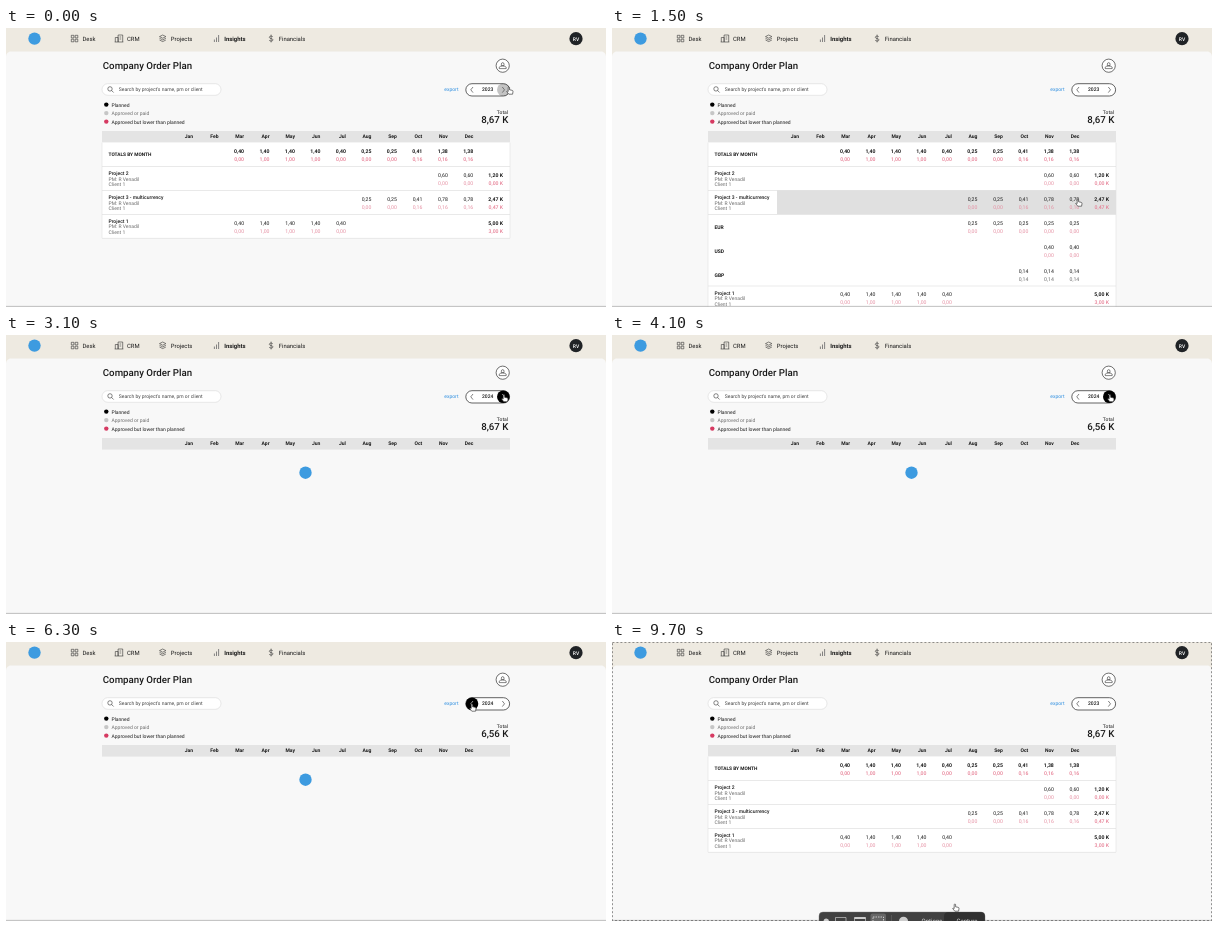
Recreate the animation shown at these times as an HTML page. Size 600x279 px, loop 10 s.

```html
<!DOCTYPE html>
<html lang="en">
<head>
<meta charset="utf-8">
<title>Company Order Plan</title>
<style>
html, body { margin: 0; width: 100%; height: 100%; overflow: hidden; background: #f8f8f8; }
svg { display: block; width: 100%; height: 100%; }
text { font-family: Roboto, Inter, sans-serif; font-size: 5px; fill: #1a1a1a; text-rendering: geometricPrecision; white-space: pre; }
.num { font-size: 5.15px; }
.m { font-weight: 500; }
.b { font-weight: 700; }
.e { text-anchor: end; }
.c { text-anchor: middle; }
.dim { fill: #6c6c6c; }
.pink { fill: #e58fa2; }
.red { fill: #e67f95; font-weight: 500; }
.nav { font-size: 5.9px; }
.big { font-size: 9.7px; font-weight: 500; }
.bar { font-size: 6px; fill: #ddd; }
.line { fill: none; stroke: #333; stroke-width: .6; }
</style>
</head>
<body>
<svg viewBox="0 0 600 279" preserveAspectRatio="none">
  <g id="base"></g>
  <g id="live"></g>
</svg>
<script>
const LOOP = 10000, STEP = 100;
const ROW = 23.9, TOP = 138.5, LEFT = 96, RIGHT = 504, WIDTH = RIGHT - LEFT;
const MONTHS = 'Jan Feb Mar Apr May Jun Jul Aug Sep Oct Nov Dec'.split(' ');
const PM = 'R Venadil', INITIALS = 'RV', BRAND = '#3d9be0';

// A span adds the same amount to every month from first to last.
const span = (first, last, amount) => ({ first, last, amount });
const series = spans => MONTHS.map((_, i) =>
  spans.reduce((sum, s) => sum + (i >= s.first && i <= s.last ? s.amount : 0), 0));
const entry = (name, plan, low = []) => ({ name, plan: series(plan), low: series(low) });

const MULTI = 'Project 3 - multicurrency';
const rest = span(9, 11, .157);
const YEARS = {
  2023: [
    entry('Project 2', [span(10, 11, .6)]),
    entry(MULTI, [span(7, 11, .25), rest, span(10, 11, .373)], [rest]),
    entry('Project 1', [span(2, 6, .4), span(3, 5, 1)], [span(3, 5, 1)])
  ],
  2024: [
    entry('Project 2', [span(0, 4, .6)]),
    entry(MULTI, [span(0, 6, .4), span(0, 1, .38)])
  ],
  2025: [entry(MULTI, [span(0, 2, .157)])]
};
const pounds = [span(9, 11, .14)];
const CURRENCIES = [entry('EUR', [span(7, 11, .25)]), entry('USD', [span(10, 11, .4)]), entry('GBP', pounds, pounds)];

// Click time, loading time, year
const LOADS = [[0, 0, 2023], [3000, 200, 2024], [4100, 200, 2025], [5300, 200, 2024], [6300, 300, 2023]];
// Pointer stops: time, x, y
const PATH = [
  [0, 503, 59], [200, 504.5, 58.5], [300, 504.5, 58.5], [1000, 466, 171], [1900, 466, 171], [2200, 494.5, 102.5],
  [2900, 498, 59.5], [4300, 498, 59.5], [4900, 466, 62], [7100, 466, 62], [7400, 343, 262], [LOOP, 343, 262]
];

const clamp = v => Math.max(0, Math.min(1, v));
const sum = list => list.reduce((a, b) => a + b, 0);
const money = v => v.toFixed(2).replace('.', ',');
const monthX = i => 187.1 + 25.47 * i;

const text = (x, y, s, cls = '', extra = '') => `<text x="${x}" y="${y}" class="${cls}" ${extra}>${s}</text>`;
const rect = (x, y, w, h, fill, extra = '') => `<rect x="${x}" y="${y}" width="${w}" height="${h}" fill="${fill}" ${extra}/>`;
const dot = (x, y, r, fill, extra = '') => `<circle cx="${x}" cy="${y}" r="${r}" fill="${fill}" ${extra}/>`;
const line = (d, extra = '') => `<path class="line" d="${d}" ${extra}/>`;
const rule = y => rect(LEFT, y - .3, WIDTH, .6, '#dcdcdc');

function pointerAt(t) {
  const i = PATH.findIndex(p => p[0] > t);
  const [t0, x0, y0] = PATH[i - 1], [t1, x1, y1] = PATH[i];
  const k = (t - t0) / (t1 - t0);
  return { x: x0 + (x1 - x0) * k, y: y0 + (y1 - y0) * k };
}

function icons() {
  const squares = [0, 1, 2, 3].map(i => `M${65.3 + 3.9 * (i % 2)} ${7.3 + 3.9 * (i >> 1)}h2.6v2.6h-2.6z`).join('');
  return line(squares) +
    line('M109.3 14V9.5h2.8V14M112.1 14V7h4.6v7M108.7 14h8.6M113.6 9h1.6M113.6 11h1.6') +
    line('M156.7 7l3.2 1.6-3.2 1.6-3.2-1.6zM153.5 10.3l3.2 1.6 3.2-1.6M153.5 12l3.2 1.6 3.2-1.6') +
    line('M208.4 14v-2.5M210.5 14V9.5M212.6 14V7', 'style="stroke:#777;stroke-width:.9"') +
    line('M266.8 8.8c-.5-1-3.5-1.1-3.5.5 0 1.7 3.7.8 3.7 2.6 0 1.6-3.4 1.5-3.9.2M265.1 6.6v7.8');
}

function drawBase() {
  const nav = [[76.5, 'Desk'], [121, 'CRM'], [164.8, 'Projects'], [218.2, 'Insights'], [272.7, 'Financials']];
  const legend = [['#000', 'Planned', ''], ['#c6c6c6', 'Approved or paid', 'dim'], ['#d63a62', 'Approved but lower than planned', '']];
  return rect(0, 0, 600, 40, '#eeeae1') +
    '<path d="M0 279V28.5a5 5 0 0 1 5-5H595a5 5 0 0 1 5 5V279z" fill="#f8f8f8"/>' +
    dot(28.5, 10.6, 6.2, BRAND) + icons() +
    nav.map(([x, s]) => text(x, 12.7, s, s === 'Insights' ? 'nav b' : 'nav')).join('') +
    dot(570, 10.7, 6.6, '#202326') + text(570, 12.5, INITIALS, 'm c', 'style="fill:#fff"') +
    text(96.8, 41, 'Company Order Plan', 'big') +
    dot(496.7, 37.7, 6.6, '#fff', 'stroke="#333" stroke-width=".7"') +
    line('M495.4 36.2a1.3 1.6 0 1 1 2.6 0v1.4h-2.6zM493.2 40.6v-1.4c1-1.6 6-1.6 7 0v1.4z') +
    rect(96, 55.7, 119, 11.6, '#fff', 'rx="5.8" stroke="#d9d9d9" stroke-width=".6"') +
    line('M106.2 60.9a2.2 2.2 0 1 1-4.4 0a2.2 2.2 0 1 1 4.4 0M105.6 62.5l2 2') +
    text(112.8, 63, 'Search by project\'s name, pm or client', '', 'style="fill:#444"') +
    text(438.3, 63.3, 'export', '', 'style="fill:#2f8fe0"') +
    legend.map(([color, s, cls], i) => dot(100.3, 76.6 + 8.5 * i, 2.2, color) + text(105.5, 78.5 + 8.5 * i, s, cls)).join('') +
    text(502, 86.1, 'Total', 'e') +
    rect(LEFT, 103, WIDTH, 11.6, '#e4e4e4') +
    MONTHS.map((m, i) => text(monthX(i), 110.2, m, 'b e')).join('');
}

function button(x, dir, heat) {
  const shade = Math.max(45, 255 * heat);
  return dot(x, 61.8, 6.3, '#000', `opacity="${heat}"`) +
    line(`M${x - dir} 59l${2.2 * dir} 2.8l${-2.2 * dir} 2.8`, `style="stroke:rgb(${shade},${shade},${shade})"`);
}

function numbers(r, y, top, low) {
  return MONTHS.map((_, i) => r.plan[i] === 0 ? '' :
    text(monthX(i), y, money(r.plan[i]), `num e ${top}`) +
    text(monthX(i), y + 8.1, money(r.low[i]), `num e ${low}`)).join('');
}

function project(r, y, hot) {
  return rect(LEFT, y, WIDTH, ROW, '#fff') +
    (hot ? rect(165, y, RIGHT - 165, ROW, '#e0e0e0') : '') +
    text(102.5, y + 8.6, r.name, 'm') + text(102.5, y + 14.1, 'PM: ' + PM, 'dim') + text(102.5, y + 19.5, 'Client 1', 'dim') +
    numbers(r, y + 10.3, '', 'pink') +
    text(497, y + 10.3, money(sum(r.plan)) + ' K', 'num b e') +
    text(497, y + 18.4, money(sum(r.low)) + ' K', 'num red e') + rule(y);
}

function currencies(y, h) {
  return `<clipPath id="fold">${rect(LEFT, y, WIDTH, h, '#000')}</clipPath><g clip-path="url(#fold)">` +
    rect(LEFT, y, WIDTH, h, '#fff') +
    CURRENCIES.map((c, i) => {
      const top = y + ROW * i;
      return text(102.5, top + 14.4, c.name, 'b') + numbers(c, top + 10.4, '', sum(c.low) ? 'dim' : 'pink');
    }).join('') + '</g>' + rule(y);
}

function table(rows, open, mouse) {
  const column = key => MONTHS.map((_, i) => sum(rows.map(r => r[key][i])));
  const totals = { plan: column('plan'), low: column('low') };
  let s = rect(LEFT, 114.6, WIDTH, TOP - 114.6, '#fff') +
    text(102.5, 128.4, 'TOTALS BY MONTH', 'b', 'style="font-size:4.8px"') + numbers(totals, 124.5, 'b', 'red');
  let y = TOP, hand = false;
  for (const r of rows) {
    const hot = mouse.y > y && mouse.y < y + ROW && mouse.x > LEFT && mouse.x < RIGHT;
    hand = hand || hot;
    s += project(r, y, hot);
    y += ROW;
    if (open && r.name === MULTI) {
      const h = ROW * CURRENCIES.length * open;
      s += currencies(y, h);
      y += h;
    }
  }
  s += rule(y) + rect(LEFT - .3, 114.6, .6, y - 114.6, '#e0e0e0') + rect(RIGHT - .3, 114.6, .6, y - 114.6, '#e0e0e0');
  return { s, hand };
}

function pointer({ x, y }, hand) {
  const d = hand
    ? 'M-.8.7C-.8-.2.6-.2.6.7V2.8l2.5.5q1 .3.9 1.3L3.6 7.2H-.2L-2.3 4.6q.1-1 1.5-.1z'
    : 'M0 0V5.8L1.3 4.6 2.2 6.6 3.2 6.2 2.3 4.2H4.1z';
  const paint = hand ? 'fill="#fff" stroke="#222"' : 'fill="#000" stroke="#fff"';
  return `<path transform="translate(${x} ${y})" d="${d}" ${paint} stroke-width=".6" stroke-linejoin="round"/>`;
}

function captureBar() {
  const pale = 'style="stroke:#ddd"';
  return rect(.4, .4, 599.2, 278.2, 'none', 'stroke="#555" stroke-width=".7" stroke-dasharray="2 2"') +
    rect(207, 270, 166, 18, '#414141', 'rx="4" stroke="#777" stroke-width=".4"') +
    rect(332, 270.3, 40.7, 17, '#303030', 'rx="4"') +
    rect(258.5, 271.5, 15.5, 14, '#666', 'rx="2"') +
    dot(214.3, 279.2, 2.7, '#ccc') +
    line('M223.5 282v-6.5h10.5v6.5M242.5 282v-6.5h11v6.5', pale) + rect(242.5, 275.3, 11, 1.6, '#ddd') +
    rect(261, 275, 10.5, 8, 'none', 'stroke="#eee" stroke-width=".7" stroke-dasharray="1.5 1"') +
    line('M279.5 273v6', 'style="stroke:#666"') + dot(291.5, 279.2, 4.5, '#ccc') +
    text(320, 281.2, 'Options', 'bar c') + text(355, 281.2, 'Capture', 'bar c');
}

function drawLive(t) {
  const mouse = pointerAt(t);
  const heat = x => clamp((7.2 - Math.hypot(mouse.x - x, mouse.y - 61.8)) / 3.6);
  const prev = heat(466), next = heat(497.3);
  const [clicked, wait, year] = LOADS.filter(l => l[0] <= t).pop();
  const busy = t < clicked + wait;
  const loaded = LOADS.filter(l => l[0] + l[1] <= t).pop()[2];
  const label = t < clicked + STEP ? loaded : year;
  const rows = YEARS[loaded], total = sum(rows.map(r => sum(r.plan)));
  const open = clamp((t - 1100) / 400) - clamp((t - 1900) / 300);
  const capture = t >= 9700;
  const body = busy ? { s: dot(299.5, 137.7, 6.2, BRAND) } : table(rows, open, mouse);
  const hand = body.hand || prev || next || t < 500 || capture;
  return rect(459.8, 55.7, 43.8, 12.3, '#fff', 'rx="6.15" stroke="#222" stroke-width=".7"') +
    button(466, -1, prev) + button(497.3, 1, next) +
    text(481.7, 63.4, label, 'm c') +
    text(502.3, 94.5, money(total) + ' K', 'big e') +
    body.s + rect(0, 277.9, 600, .7, '#a5a5a5') +
    (capture ? captureBar() : '') + pointer(mouse, hand);
}

const base = document.getElementById('base'), live = document.getElementById('live');
base.innerHTML = drawBase();
const start = performance.now();
let shown = -1;
function tick() {
  const t = Math.floor((performance.now() - start) % LOOP / STEP) * STEP;
  if (t !== shown) {
    live.innerHTML = drawLive(t);
    shown = t;
  }
  requestAnimationFrame(tick);
}
tick();
</script>
</body>
</html>
```
